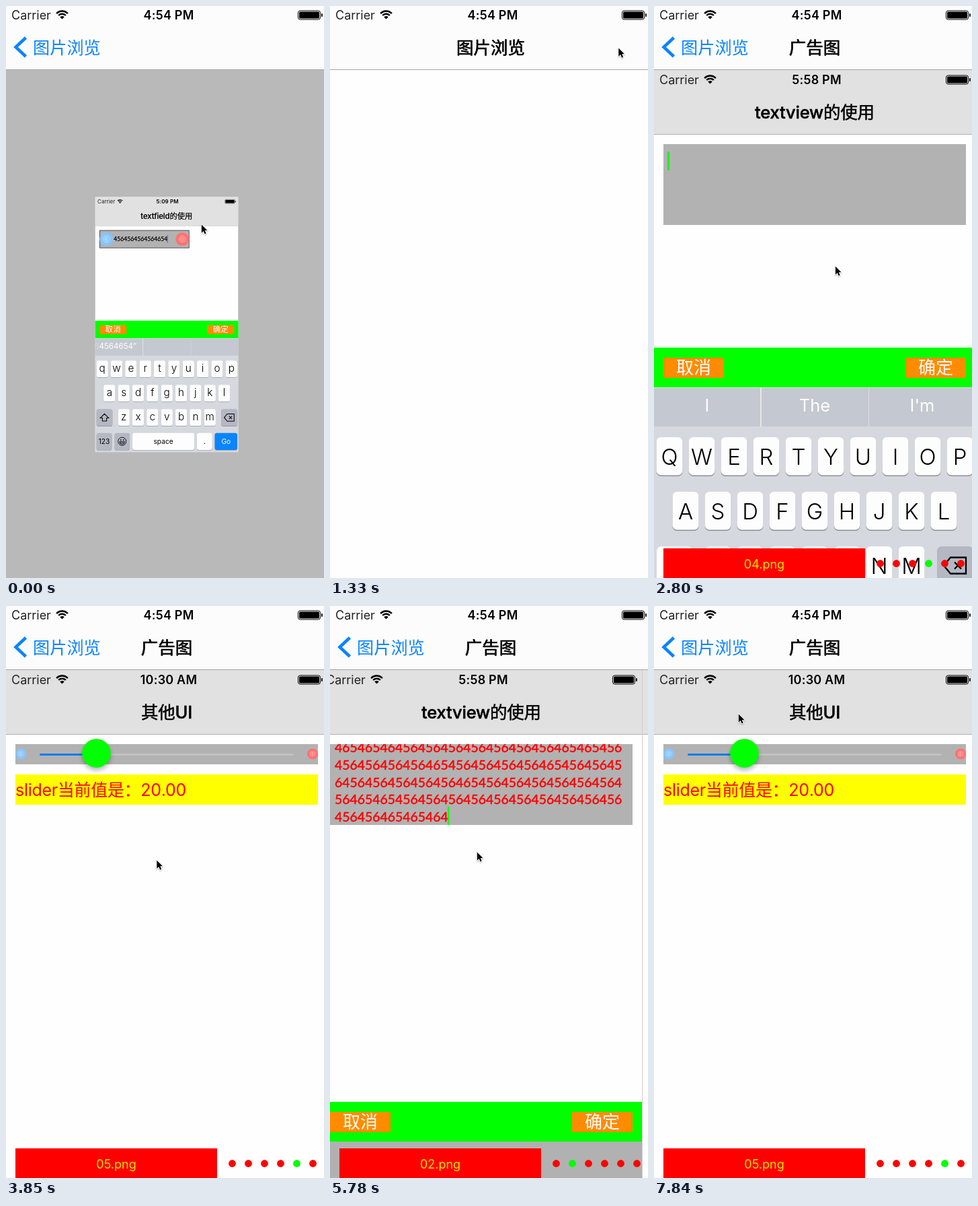
An HTML page with a canvas for the animation above (7.99 s loop, 473 px wide and 849 px high).

```html
<!DOCTYPE html>
<html lang="zh-CN">
<head>
<meta charset="utf-8">
<title>图片浏览</title>
<style>
html, body { margin: 0; width: 100%; height: 100%; overflow: hidden; background: #fff; }
canvas { display: block; }
</style>
</head>
<body>
<canvas id="stage" width="473" height="849"></canvas>
<script>
const ctx = document.getElementById('stage').getContext('2d');
const W = 473, H = 849, PAGE = 479, TOP = 94, LOOP = 7990;
const UI = 'Inter, "Noto Sans CJK SC", "Noto Sans CJK", sans-serif';
const DIGITS = 'Lato, sans-serif';
const BLUE = '#0a84ff', GRAY = '#b2b2b2', ORANGE = '#ff8c00', GREEN = '#00ff00';
const KEY = '#fdfdfd', SPECIAL = '#b3b8c3';

const clamp = u => Math.max(0, Math.min(1, u));
const span = (t, start, length) => clamp((t - start) / length);
const easeOut = u => 1 - (1 - u) ** 3;
const smooth = u => u * u * (3 - 2 * u);

function rect(x, y, w, h, color) {
  ctx.fillStyle = color;
  ctx.fillRect(x, y, w, h);
}

function disc(x, y, r, color) {
  ctx.fillStyle = color;
  ctx.beginPath();
  ctx.arc(x, y, r, 0, 7);
  ctx.fill();
}

function arc(x, y, r, from, to, width, color) {
  ctx.strokeStyle = color;
  ctx.lineWidth = width;
  ctx.beginPath();
  ctx.arc(x, y, r, from, to);
  ctx.stroke();
}

function round(x, y, w, h, r, color) {
  ctx.fillStyle = color;
  ctx.beginPath();
  ctx.roundRect(x, y, w, h, r);
  ctx.fill();
}

function path(points, close) {
  ctx.beginPath();
  points.forEach(([x, y]) => ctx.lineTo(x, y));
  if (close) ctx.closePath();
}

function line(points, width, color, close) {
  path(points, close);
  ctx.strokeStyle = color;
  ctx.lineWidth = width;
  ctx.stroke();
}

// y is the middle of the capitals; bold thickens a face between its weights
function text(s, x, y, size, color, { align = 'center', weight = 400, family = UI, spacing = 0, bold = 0 } = {}) {
  ctx.font = `${weight} ${size}px ${family}`;
  ctx.letterSpacing = spacing + 'px';
  ctx.textAlign = align;
  ctx.fillStyle = color;
  ctx.fillText(s, x, y + size * 0.365);
  if (!bold) return;
  ctx.strokeStyle = color;
  ctx.lineWidth = bold;
  ctx.lineJoin = 'round';
  ctx.strokeText(s, x, y + size * 0.365);
  ctx.lineJoin = 'miter';
}

function digits(s, x, y, color) {
  text(s, x, y, 19.4, color, { align: 'left', family: DIGITS, bold: 0.5 });
}

function statusBar(y, clock) {
  text('Carrier', 8, y, 18, '#222', { align: 'left' });
  text(clock, 242, y, 18, '#000', { weight: 600, spacing: 0.2 });
  for (const r of [11.5, 7.3]) arc(83.5, y + 5.5, r, -Math.PI * 0.76, -Math.PI * 0.24, 2.4, '#000');
  ctx.fillStyle = '#000';
  ctx.beginPath();
  ctx.moveTo(83.5, y + 6);
  ctx.arc(83.5, y + 6, 4.6, -Math.PI * 0.76, -Math.PI * 0.24);
  ctx.fill();
  ctx.strokeStyle = '#000';
  ctx.lineWidth = 1;
  ctx.beginPath();
  ctx.roundRect(434.5, y - 6.5, 33, 13, 3);
  ctx.stroke();
  round(436, y - 5, 30, 10, 1.5, '#000');
  round(469, y - 2.5, 1.8, 5, 1, '#000');
}

function header(title, clock) {
  rect(0, 0, PAGE, 96, '#e1e1e1');
  rect(0, 96, PAGE, 1, '#b0b0b0');
  statusBar(15.5, clock);
  text(title, 239, 63.5, 25.5, '#000', { weight: 500, spacing: -0.2, bold: 0.5 });
}

function swirlIcon(x, y, r, color) {
  disc(x, y, r, color);
  const k = r / 22.5;
  arc(x, y, 10.5 * k, 0, 7, k, '#fff');
  arc(x, y, 5.5 * k, 0.6, 5.7, k, '#fff');
  arc(x, y, 2.5 * k, 0, 7, k, '#fff');
}

function powerIcon(x, y, r, color) {
  disc(x, y, r, color);
  arc(x, y, 10.5, 0, 7, 1, '#fff');
  arc(x, y, 5, -1, Math.PI + 1, 1.2, '#fff');
  line([[x, y - 6.5], [x, y]], 1.2, '#fff');
}

function toolbar(y) {
  rect(-1, y, PAGE + 1, 59, GREEN);
  [['取消', 14], ['确定', 374]].forEach(([label, x]) => {
    rect(x, y + 15, 90, 30, ORANGE);
    text(label, x + 45, y + 29.5, 26, '#fff');
  });
}

function key(x, y, w, label, color = KEY, size = 23, ink = '#000', dy = 28.5, weight = 400) {
  round(x, y + 1.5, w, 56.5, 7, '#8b8e94');
  round(x, y, w, 56.5, 7, color);
  if (label) text(label, x + w / 2, y + dy, size, ink, { weight });
}

function shiftIcon(x, y) {
  line([[x, y - 12], [x + 14, y + 2], [x + 7, y + 2], [x + 7, y + 12],
    [x - 7, y + 12], [x - 7, y + 2], [x - 14, y + 2]], 2.3, '#000', true);
}

function deleteIcon(x, y) {
  line([[x - 17, y], [x - 7, y - 12], [x + 16, y - 12], [x + 16, y + 12], [x - 7, y + 12]], 2.3, '#000', true);
  line([[x - 1, y - 5], [x + 9, y + 5]], 2.3, '#000');
  line([[x + 9, y - 5], [x - 1, y + 5]], 2.3, '#000');
}

function smileIcon(x, y) {
  arc(x, y, 13.5, 0, 7, 2, '#000');
  disc(x - 4.5, y - 4.5, 2, '#000');
  disc(x + 4.5, y - 4.5, 2, '#000');
  ctx.beginPath();
  ctx.arc(x, y + 1, 8.5, 0, Math.PI);
  ctx.closePath();
  ctx.stroke();
  line([[x - 7, y + 4.5], [x + 7, y + 4.5]], 1.5, '#000');
}

function keyboard(upper) {
  rect(-1, 472, PAGE + 1, 58, '#c4c8d0');
  rect(-1, 472, PAGE + 1, 1, '#dde0e4');
  rect(158, 472, 2, 58, '#e6e8eb');
  rect(319, 472, 1, 58, '#dcdfe3');
  rect(-1, 530, PAGE + 1, 324, '#d5d8de');
  if (upper) {
    ['I', 'The', "I'm"].forEach((s, i) => text(s, 79 + 160 * i, 498.5, 25.5, '#fff'));
  } else {
    const fade = ctx.createLinearGradient(-4, 0, 16, 0);
    fade.addColorStop(0, 'rgba(255,255,255,.1)');
    fade.addColorStop(0.7, 'rgba(255,255,255,.4)');
    fade.addColorStop(1, '#fff');
    text('64564654”', 137.5, 498.5, 26, fade, { align: 'right' });
  }
  [['qwertyuiop', 3.5, 546], ['asdfghjkl', 27.5, 627], ['zxcvbnm', 75.5, 708]].forEach(([row, x0, y]) => {
    [...row].forEach((c, i) => {
      const x = x0 + 48 * i;
      if (upper) key(x, y, 39, c.toUpperCase(), KEY, 33, '#000', 29, 300);
      else key(x, y, 39, c, KEY, 34.5, '#000', 25.5, 300);
    });
  });
  key(4, 708, 53, '', upper ? KEY : SPECIAL);
  shiftIcon(30.5, 736);
  key(421, 708, 54, '', SPECIAL);
  deleteIcon(448, 736.5);
  key(4, 788, 51, '123', SPECIAL);
  key(64.5, 788, 50.5, '', SPECIAL);
  smileIcon(89.5, 816);
  key(124, 788, 207, 'space');
  key(339.5, 788, 51.5, '.');
  key(399.5, 788, 75, 'Go', BLUE, 23, '#fff');
}

function textField(typing) {
  header('textfield的使用', '5:09 PM');
  ctx.translate(1, 0);
  rect(14, 111, 300, 60, '#111');
  rect(15.5, 112.5, 297, 57, GRAY);
  swirlIcon(36.5, 141, 22.5, '#87c5fd');
  powerIcon(291, 141, 22.5, '#fe7373');
  digits('4564564564564654', 61.5, 141, '#000');
  if (!typing) return;
  rect(240, 127, 2.5, 27, '#4a72e6');
  toolbar(413);
  keyboard(false);
}

function textView() {
  header('textview的使用', '5:58 PM');
  rect(14, 111, 450, 120, GRAY);
}

const NOTE = [
  '46546546456456456456456456456465465456',
  '45645645645646545645645645646545645645',
  '64564564564564564654564564564564564564',
  '56465465456456456456456456456456456456',
  '456456465465464'
];

function filledView() {
  textView();
  ctx.save();
  ctx.beginPath();
  ctx.rect(14, 111, 450, 120);
  ctx.clip();
  NOTE.forEach((s, i) => digits(s, 21, 116.3 + 25.7 * i, '#f00'));
  rect(189, 204, 2.5, 27, GREEN);
  ctx.restore();
  toolbar(642);
  rect(0, 701, PAGE, 153, '#b1b1b1');
}

function typingView() {
  textView();
  rect(20, 122, 3, 28, GREEN);
  toolbar(413);
  keyboard(true);
}

function sliderPage() {
  header('其他UI', '10:30 AM');
  rect(14, 111, 450, 30, GRAY);
  swirlIcon(22, 125.5, 8, '#87c5fd');
  swirlIcon(456, 125.5, 8, '#fe7373');
  round(50, 125, 378, 3, 1.5, '#c1c1c1');
  round(50, 125, 85, 3, 1.5, '#0a7cf0');
  ctx.save();
  ctx.shadowColor = 'rgba(0,0,0,.28)';
  ctx.shadowBlur = 6;
  ctx.shadowOffsetY = 4;
  disc(134.5, 124.5, 21.3, GREEN);
  ctx.restore();
  rect(14, 156, 450, 45, '#ffff00');
  text('slider当前值是：20.00', 14, 179, 25, '#f00', { align: 'left', spacing: -0.3 });
}

const PAGES = [() => textField(false), filledView, textView, typingView, sliderPage, () => textField(true)];
const SWIPES = [2300, 3250, 4380, 4850, 5290, 5745, 6380, 7020];

function drawAt(x, y, scale, draw) {
  ctx.save();
  ctx.translate(x, y);
  ctx.scale(scale, scale);
  ctx.beginPath();
  ctx.rect(0, 0, PAGE, 852);
  ctx.clip();
  rect(0, 0, PAGE, 852, '#fefefe');
  draw();
  ctx.restore();
}

function viewer(t) {
  const scale = 0.4447 + 0.4447 * easeOut(span(t, 150, 420));
  rect(0, TOP, PAGE, H, '#b9b9b9');
  drawAt(239 - PAGE / 2 * scale, 472.8 - 426 * scale, scale, () => textField(true));
}

function carousel(t) {
  const pos = SWIPES.reduce((sum, start) => sum + smooth(span(t, start, 350)), 2);
  const first = Math.floor(pos), shift = Math.round((pos - first) * PAGE);
  const active = Math.round(pos) % 6;
  drawAt(-shift, TOP, 1, PAGES[first % 6]);
  if (shift) {
    drawAt(PAGE - shift, TOP, 1, PAGES[(first + 1) % 6]);
    rect(PAGE - shift - 1, TOP, 1, H, '#cfcfcf');
  }
  rect(14, 805, 300, 44, '#f00');
  text(`0${active + 1}.png`, 164, 828, 18, '#e6e600');
  for (let i = 0; i < 6; i++) disc(336.5 + 24 * i, 827.5, 5.4, i === active ? GREEN : '#f00');
}

function navBar(t, shown, title, backAlpha) {
  const sliding = t > 1505 && t < 2000;
  rect(0, 0, W, TOP, sliding ? '#f7f7f7' : '#fcfcfc');
  rect(0, TOP, W, 1, '#a6a6a6');
  statusBar(13.5, '4:54 PM');
  ctx.globalAlpha = 1 - shown;
  text('图片浏览', 239 - 115 * shown, 61.5, 25.5, '#000', { bold: 0.7 });
  ctx.globalAlpha = shown;
  text(title, 239 + 171 * (1 - shown), 61.5, 25.5, '#000', { bold: 0.7 });
  ctx.globalAlpha = backAlpha;
  line([[29.5, 47], [14.5, 61], [29.5, 75]], 4.6, BLUE);
  text('图片浏览', 40 + 75 * (1 - shown), 61.5, 25.2, BLUE, { align: 'left' });
  ctx.globalAlpha = 1;
}

// time, x, y of the pointer tip
const POINTER = [
  [0, 290, 324], [350, 290, 324], [720, 94, 69], [880, 94, 69], [1350, 430, 62], [1560, 430, 64],
  [1920, 359, 106], [2250, 330, 380], [2800, 269, 386], [3250, 300, 384], [3600, 200, 378],
  [4350, 290, 374], [4730, 214, 368], [5780, 218, 365], [6400, 225, 366], [7100, 205, 350], [7840, 125, 160]
];

function pointer(t) {
  const next = POINTER.findIndex(p => p[0] > t);
  const b = next < 0 ? POINTER[POINTER.length - 1] : POINTER[next];
  const a = next < 0 ? b : POINTER[next - 1];
  const u = b === a ? 0 : smooth((t - a[0]) / (b[0] - a[0]));
  ctx.save();
  ctx.translate(a[1] + (b[1] - a[1]) * u, a[2] + (b[2] - a[2]) * u);
  ctx.scale(0.85, 0.85);
  path([[1, 0.5], [1, 15], [4.4, 11.8], [6.7, 17.2], [9, 16], [6.8, 10.8], [11, 10.6]], true);
  ctx.shadowColor = 'rgba(0,0,0,.3)';
  ctx.shadowBlur = 2;
  ctx.shadowOffsetY = 1;
  ctx.strokeStyle = '#fff';
  ctx.lineWidth = 2;
  ctx.stroke();
  ctx.shadowColor = 'transparent';
  ctx.fillStyle = '#000';
  ctx.fill();
  ctx.restore();
}

function draw(t) {
  const popping = t < 1360;
  const u = popping ? span(t, 860, 420) : span(t, 1505, 600);
  const shown = popping ? 1 - easeOut(u) : easeOut(u);
  rect(0, 0, W, H, '#fefefe');
  rect(0, TOP, W, H, `rgba(0,0,0,${0.092 * shown})`);
  if (shown > 0) {
    ctx.save();
    ctx.translate(Math.round((1 - shown) * PAGE), 0);
    popping ? viewer(t) : carousel(t);
    ctx.restore();
  }
  const pressed = 1 - 0.8 * span(t, 650, 60);
  const backAlpha = popping ? pressed * (1 - u) : clamp((u - 0.4) / 0.6);
  navBar(t, shown, popping ? '' : '广告图', backAlpha);
  pointer(t);
}

const begin = performance.now();
function tick() {
  draw((performance.now() - begin) % LOOP);
  requestAnimationFrame(tick);
}
tick();
</script>
</body>
</html>
```
